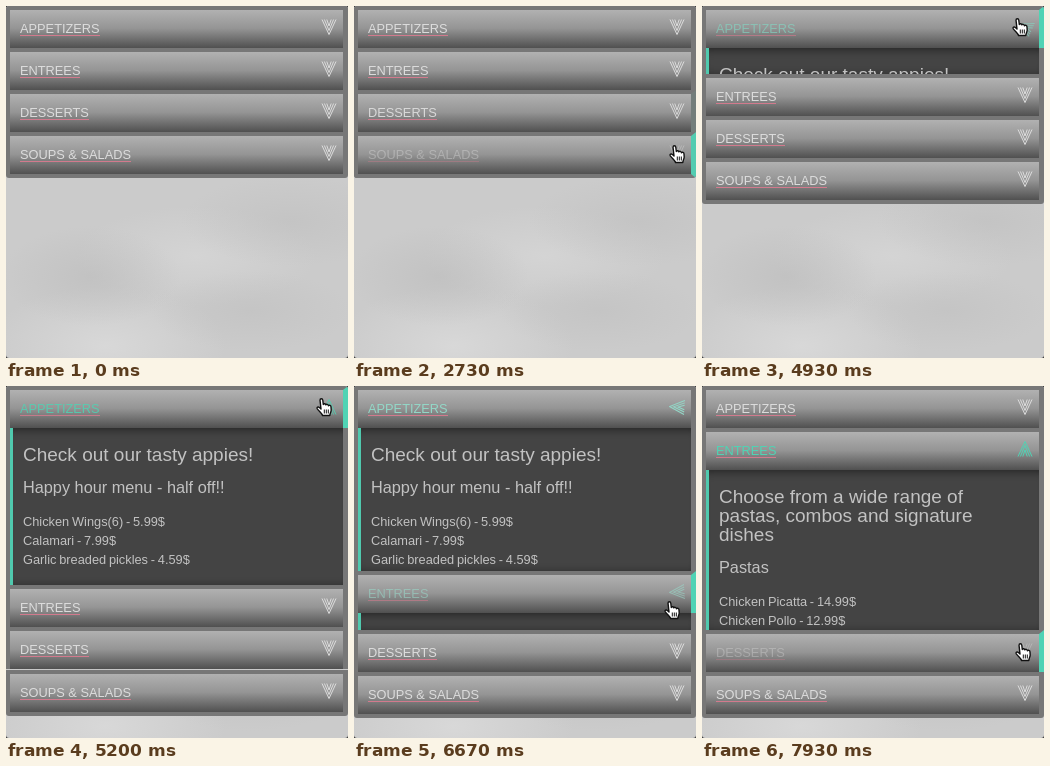
An HTML page for the animation above (8000 ms loop, 342 by 352 pixels).

```html
<!DOCTYPE html>
<html lang="en">
<head>
<meta charset="utf-8">
<title>Menu accordion</title>
<style>
  html, body { margin: 0; width: 100%; height: 100%; overflow: hidden; background: #333; }
  #stage {
    position: relative; width: 342px; height: 352px; overflow: hidden; border-radius: 3px;
    font-family: "Liberation Sans", Arial, sans-serif; white-space: nowrap;
    background:
      radial-gradient(ellipse 90px 50px at 85px 270px, #bcbcbc99, transparent),
      radial-gradient(ellipse 110px 45px at 285px 215px, #bebebe88, transparent),
      radial-gradient(ellipse 100px 40px at 245px 305px, #bfbfbf88, transparent),
      radial-gradient(ellipse 120px 60px at 100px 340px, #d8d8d8, transparent),
      radial-gradient(ellipse 120px 50px at 190px 250px, #d4d4d4, transparent),
      #cbcbcb;
  }
  .item { position: absolute; left: 0; width: 342px; }
  .head {
    position: relative; box-sizing: border-box; height: 42px;
    border: solid #777; border-width: 4px 5px 0 4px;
    background: linear-gradient(#b1b1b1, #959595 48%, #505050) padding-box;
  }
  .item.first .head { border-radius: 3px 3px 0 0; }
  .item.last .head { height: 46px; border-bottom-width: 4px; border-radius: 0 0 3px 3px; }
  .label { position: absolute; left: 10px; top: 11px; font-size: 12.8px; line-height: 16px; }
  .label::after {
    content: ""; position: absolute; left: 0; right: 0; bottom: 1px; height: 1px; background: #d27a8d;
  }
  .arrow { position: absolute; left: 311px; top: 9px; width: 16px; height: 16px; fill: none; stroke: currentColor; }
  .panel {
    position: absolute; top: 42px; left: 0; width: 342px; box-sizing: border-box;
    padding: 0 5px 0 4px; background: #777; overflow: hidden;
  }
  .body {
    height: 100%; box-sizing: border-box; padding: 17px 0 0 10px; overflow: hidden;
    border-left: 3px solid #50c9ae; background: #444; color: #c2c2c2;
    box-shadow: inset 0 10px 8px -8px #0007, inset 0 -8px 8px -8px #0005;
  }
  .body > * { margin: 0; font-weight: normal; line-height: 19px; }
  h3 { font-size: 19px; }
  .body h4 { font-size: 16.3px; margin: 14px 0 15px; }
  p { font-size: 12.8px; word-spacing: -.8px; }
  #hand { position: absolute; left: 0; top: 0; width: 18px; height: 19px; }
</style>
</head>
<body>
<div id="stage"></div>
<script>
const LOOP = 8000, FADE = 300, SLIDE = 410, FULL = 160, HEAD = 42;
const ENTER = 70, OPEN_FIRST = 4822, OPEN_SECOND = 6586;

const menu = [
  ['APPETIZERS', 'Check out our tasty appies!', 'Happy hour menu - half off!!',
    ['Chicken Wings(6) - 5.99$', 'Calamari - 7.99$', 'Garlic breaded pickles - 4.59$']],
  ['ENTREES', 'Choose from a wide range of<br>pastas, combos and signature<br>dishes', 'Pastas',
    ['Chicken Picatta - 14.99$', 'Chicken Pollo - 12.99$']],
  ['DESSERTS'],
  ['SOUPS &amp; SALADS']
];

// Pointer stops: time, x, y of the fingertip
const stops = [
  [ENTER, 340, 152], [870, 319, 20], [1800, 319, 82], [3000, 320, 148], [3430, 317, 146],
  [3810, 313, 14], [4130, 317, 143], [4530, 315, 13], [5620, 315, 13],
  [6500, 315, 216], [6800, 315, 216], [7800, 318, 258], [LOOP, 318, 258]
];

const clamp = v => Math.min(1, Math.max(0, v));
const swing = p => 0.5 - Math.cos(Math.PI * clamp(p)) / 2;
const mix = (a, b, k) => a.map((v, i) => v + (b[i] - v) * k);
const rgb = c => `rgb(${c.map(Math.round)})`;

// CSS "ease": cubic-bezier(.25, .1, .25, 1)
function ease(p) {
  if (p <= 0) return 0;
  if (p >= 1) return 1;
  let lo = 0, hi = 1, u;
  for (let i = 0; i < 16; i++) {
    u = (lo + hi) / 2;
    if (0.75 * u * (1 - u) + u ** 3 < p) lo = u; else hi = u;
  }
  return 0.3 * u * (1 - u) ** 2 + 3 * u * u * (1 - u) + u ** 3;
}

const fade = (t, start) => ease((t - start) / FADE);
const slide = (t, start) => swing((t - start) / SLIDE);

function fingertip(t) {
  const i = Math.max(1, stops.findIndex(s => s[0] > t));
  const [a, b] = [stops[i - 1], stops[i]];
  return mix(a, b, swing((t - a[0]) / (b[0] - a[0])));
}

function itemTops(t) {
  const first = slide(t, OPEN_FIRST), second = slide(t, OPEN_SECOND);
  const total = FULL * first;
  return [0, HEAD + Math.floor(FULL * (first - second)), 2 * HEAD + Math.floor(total), 3 * HEAD + Math.round(total)];
}

// Follow the pointer once to learn when each header is entered and left.
function findHovers() {
  const spans = menu.map(() => []);
  let last = -1;
  for (let t = ENTER; t < LOOP; t += 10) {
    const y = fingertip(t)[2];
    const now = itemTops(t).findIndex(top => y >= top && y < top + HEAD);
    if (now === last) continue;
    if (last >= 0) spans[last].at(-1).leave = t;
    if (now >= 0) spans[now].push({ enter: t, leave: Infinity });
    last = now;
  }
  return spans;
}

const hovers = findHovers();
const hoverAt = (t, i) =>
  clamp(hovers[i].reduce((sum, s) => sum + fade(t, s.enter) - fade(t, s.leave), 0));

const stage = document.getElementById('stage');
const panelHtml = ([, title, sub, list]) => title ? `<div class="panel"><div class="body">
  <h3>${title}</h3><h4>${sub}</h4>${list.map(s => `<p>${s}</p>`).join('')}</div></div>` : '';
const place = i => i === 0 ? 'first' : i === menu.length - 1 ? 'last' : '';

stage.innerHTML = menu.map((m, i) => `<div class="item ${place(i)}"><div class="head">
  <span class="label">${m[0]}</span>
  <svg class="arrow" viewBox="0 0 16 16"><path d="M1 .5 8 15.5 15 .5M3.4 .5 8 11.5 12.6 .5M5.8 .5 8 7 10.2 .5"/></svg>
  </div>${panelHtml(m)}</div>`).join('') +
  `<svg id="hand" viewBox="0 0 18 19"><path fill="#fff" stroke="#111" stroke-width="1.4" stroke-linejoin="round"
  d="M4 2.2C4 .3 6.6 .3 6.8 2.2L7.3 6.5C7.6 5.3 9.6 5.4 9.8 6.9 10.4 5.9 12.2 6.2 12.4 7.7 13.2 6.9 15 7.3 15 9
  L15.2 12C15.2 14 14 15 13.8 17.5H6.6C6.2 15.6 3.4 13.6 1.3 10.8 .4 9.2 2.2 8.4 3.4 9.5L5 11Z"/>
  <path stroke="#111" d="M8.3 11.5v4M10.3 11.5v4M12.3 11.5v4"/></svg>`;

const hand = document.getElementById('hand');
const items = [...stage.querySelectorAll('.item')].map(el => ({
  el,
  head: el.querySelector('.head'),
  label: el.querySelector('.label'),
  arrow: el.querySelector('.arrow'),
  panel: el.querySelector('.panel')
}));

const LIGHT = [220, 220, 220], TEAL = [80, 211, 180], FRAME = [119, 119, 119];

function render(t) {
  const second = fade(t, OPEN_SECOND);
  const active = [fade(t, OPEN_FIRST) - second, second, 0, 0];
  const tops = itemTops(t);

  items.forEach(({ el, head, label, arrow, panel }, i) => {
    const hover = hoverAt(t, i), on = active[i];
    el.style.top = tops[i] + 'px';
    head.style.borderRightColor = rgb(mix(FRAME, TEAL, hover));
    label.style.color = arrow.style.color = rgb(mix(LIGHT, TEAL, on));
    label.style.opacity = arrow.style.opacity = 1 - 0.65 * hover * (1 - 0.75 * on);
    arrow.style.transform = `rotate(${180 * on}deg)`;
    if (panel) panel.style.height = tops[i + 1] - tops[i] - HEAD + 'px';
  });

  const [, x, y] = fingertip(t);
  hand.style.visibility = t < ENTER ? 'hidden' : 'visible';
  hand.style.transform = `translate(${Math.round(x) - 5}px, ${Math.round(y) - 1}px)`;
}

const begin = performance.now();
function tick() {
  render((performance.now() - begin) % LOOP);
  requestAnimationFrame(tick);
}
render(0);
requestAnimationFrame(tick);
</script>
</body>
</html>
```
